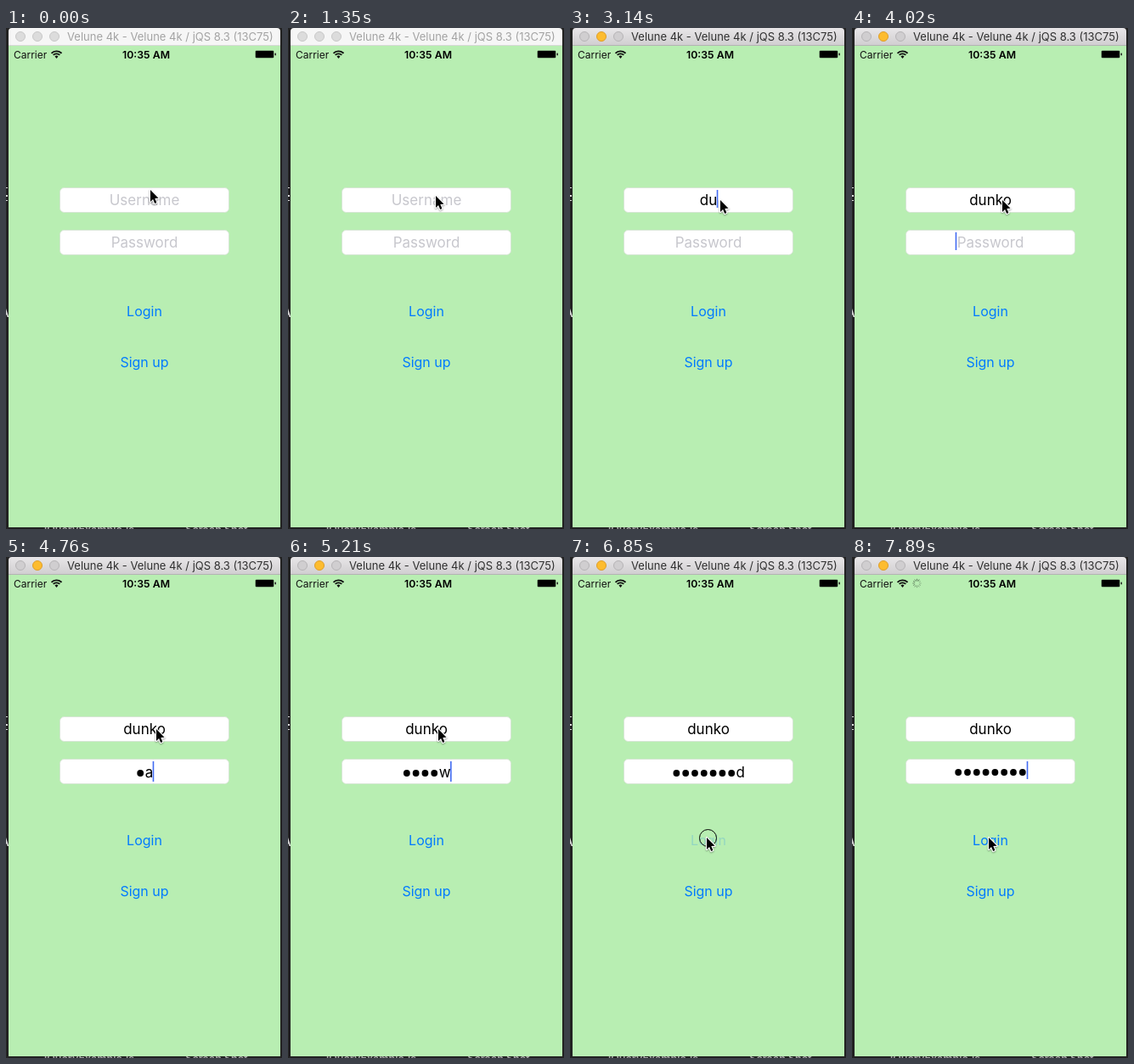
Animation of 325x591 px, one loop 8 s. Source, as an HTML page with a canvas:

```html
<!DOCTYPE html>
<html lang="en">
<head>
<meta charset="utf-8">
<title>Login screen</title>
<style>
  html, body { margin: 0; width: 100%; height: 100%; overflow: hidden; background: #222; }
  canvas { display: block; }
</style>
</head>
<body>
<canvas id="stage" width="325" height="591"></canvas>
<script>
const ctx = document.getElementById('stage').getContext('2d');
const LOOP = 8000, CENTER = 163, DOT = 10.8;
const USER = 'dunko', SECRET = 'password';

// Timelines: [start time, value]; each value holds until the next entry.
const pointer = [[0, [170, 191]], [1350, [174, 198]], [1490, [177, 203]], [6100, [182, 296]],
  [6250, [171, 355]], [6400, [163, 340]], [6550, [161, 331]]];
const pressed = [[0, false], [1790, true], [1940, false], [6850, true], [7000, false]];
const caret = [[0, ''], [1940, 'user'], [2540, ''], [2990, 'user'], [4020, 'pass'],
  [6400, ''], [7000, 'pass'], [7590, ''], [7890, 'pass']];
const userLength = [[0, 0], [2990, 1], [3140, 2], [3290, 4], [3430, 5]];
const passLength = [[0, 0], ...[4610, 4760, 4910, 5060, 5210, 5360, 5510, 5810].map((t, i) => [t, i + 1])];
const loginAlpha = [[0, 1], [6850, 0.2], [7000, 0.45], [7150, 0.85], [7300, 1]];
const MASK_LAST = 7740, SPINNER_START = 7150, ACTIVATE = 1790;

const at = (timeline, t) => timeline.filter(([start]) => start <= t).pop()[1];

function rect(x, y, w, h, color) {
  ctx.fillStyle = color;
  ctx.fillRect(x, y, w, h);
}

function round(x, y, w, h, r, fill, stroke) {
  ctx.beginPath();
  ctx.roundRect(x, y, w, h, r);
  if (fill) { ctx.fillStyle = fill; ctx.fill(); }
  if (stroke) { ctx.strokeStyle = stroke; ctx.lineWidth = 1; ctx.stroke(); }
}

function circle(x, y, r, fill, stroke) {
  round(x - r, y - r, 2 * r, 2 * r, r, fill, stroke);
}

function text(str, x, y, size, color, align = 'center', weight = 400) {
  ctx.font = `${weight} ${size}px Inter, sans-serif`;
  ctx.textAlign = align;
  ctx.fillStyle = color;
  ctx.fillText(str, x, y);
}

function textWidth(str, size) {
  ctx.font = `400 ${size}px Inter, sans-serif`;
  return ctx.measureText(str).width;
}

function desktop() {
  rect(0, 0, 325, 591, '#222');
  text('jQueryExample.js', 98, 596, 12.5, '#aaa', 'center', 600);
  text('Screen Shot', 248, 596, 12.5, '#aaa', 'center', 600);
  text('A', -5.5, 341, 12.5, '#ddd', 'left', 600);
  for (const [y, h] of [[188, 1], [197, 2], [203, 1]]) rect(0, y, 2, h, '#ddd');
}

function titleBar(active) {
  const fill = ctx.createLinearGradient(0, 0, 0, 20);
  fill.addColorStop(0, active ? '#e8e6e8' : '#f6f6f6');
  fill.addColorStop(1, active ? '#d1cfd1' : '#f6f6f6');
  round(3, 0, 320, 30, 4, fill);
  rect(3, 20, 320, 1, active ? '#b4b2b4' : '#d8d8d8');
  const gray = active ? ['#d0ced0', '#b6b4b6'] : ['#dcdcdc', '#c8c8c8'];
  [17, 37, 57].forEach((x, i) =>
    circle(x, 10, 5.5, ...(active && i === 1 ? ['#fdbc2f', '#dd9e2a'] : gray)));
  text('Velune 4k - Velune 4k / jQS 8.3 (13C75)', 72, 15, 13, active ? '#303030' : '#a3a3a3', 'left');
}

function statusBar(t) {
  text('Carrier', 9, 35.5, 12, '#111', 'left');
  text('10:35 AM', 165, 35.5, 12.3, '#000', 'center', 600);

  ctx.strokeStyle = '#111';
  ctx.lineWidth = 1.8;
  for (const r of [8.2, 5.2]) {
    ctx.beginPath();
    ctx.arc(59.5, 35.5, r, -Math.PI * 0.76, -Math.PI * 0.24);
    ctx.stroke();
  }
  ctx.beginPath();
  ctx.moveTo(59.5, 36);
  ctx.arc(59.5, 35.5, 2.8, -Math.PI * 0.76, -Math.PI * 0.24);
  ctx.fillStyle = '#111';
  ctx.fill();

  round(293.5, 26.5, 22, 9, 2, null, 'rgba(0,0,0,.25)');
  rect(294, 27, 21, 8, '#000');
  round(316.5, 29.5, 1.5, 3, 1, '#222');

  if (t >= SPINNER_START) spinner(76.5, 31, Math.floor((t - SPINNER_START) / 148) * 2);
}

function spinner(x, y, head) {
  ctx.lineWidth = 0.9;
  for (let i = 0; i < 12; i++) {
    const angle = (head - i) * Math.PI / 6;
    const dx = Math.cos(angle), dy = Math.sin(angle);
    ctx.strokeStyle = `rgba(50,65,50,${0.8 - i * 0.045})`;
    ctx.beginPath();
    ctx.moveTo(x + dx * 2.7, y + dy * 2.7);
    ctx.lineTo(x + dx * 5.2, y + dy * 5.2);
    ctx.stroke();
  }
}

// Draws a centred field; masked fields show dots and optionally the last letter.
function field(y, placeholder, value, focused, masked, showLast) {
  round(63.5, y - 0.5, 199, 29, 5, '#fff', '#d6e6d4');
  let caretX, caretHeight = 21;
  if (!value) {
    text(placeholder, CENTER, y + 20, 17, '#c7c7cd');
    caretX = CENTER - textWidth(placeholder, 17) / 2 - 2;
  } else if (!masked) {
    text(value, CENTER, y + 20, 17, '#000');
    caretX = CENTER + textWidth(value, 17) / 2 - 0.5;
  } else {
    const dots = value.length - (showLast ? 1 : 0);
    const last = showLast ? value.slice(-1) : '';
    const width = dots * DOT + textWidth(last, 17);
    const left = CENTER - width / 2;
    const dotY = y + (showLast ? 16 : 15);
    for (let i = 0; i < dots; i++) circle(left + DOT * (i + 0.5), dotY, 3.9, '#000');
    text(last, left + dots * DOT, y + 21, 17, '#000', 'left');
    caretX = left + width - 0.5;
    if (showLast) caretHeight = 24;
  }
  if (focused) rect(caretX, y + 2, 1.6, caretHeight, '#426bf2');
}

function arrow(x, y) {
  ctx.save();
  ctx.translate(x, y);
  ctx.beginPath();
  [[0, 0], [0, 14], [3.1, 11], [5.2, 16], [7.4, 15.1], [5.3, 10.1], [9.6, 9.8]]
    .forEach(p => ctx.lineTo(...p));
  ctx.closePath();
  ctx.lineJoin = 'round';
  ctx.shadowColor = 'rgba(0,0,0,.35)';
  ctx.shadowBlur = 2;
  ctx.shadowOffsetY = 1;
  ctx.strokeStyle = '#fff';
  ctx.lineWidth = 2.2;
  ctx.stroke();
  ctx.shadowColor = 'transparent';
  ctx.fillStyle = '#000';
  ctx.fill();
  ctx.restore();
}

function draw(t) {
  desktop();
  titleBar(t >= ACTIVATE);
  rect(3, 21, 320, 568, '#b8eeb2');
  statusBar(t);

  const focus = at(caret, t);
  field(189, 'Username', USER.slice(0, at(userLength, t)), focus === 'user');
  field(239, 'Password', SECRET.slice(0, at(passLength, t)), focus === 'pass', true, t < MASK_LAST);

  ctx.globalAlpha = at(loginAlpha, t);
  text('Login', CENTER, 340, 16, '#007aff');
  ctx.globalAlpha = 1;
  text('Sign up', CENTER, 400, 16, '#007aff');

  const [x, y] = at(pointer, t);
  if (at(pressed, t)) circle(x + 1.5, y + 0.5, 10, null, '#000');
  arrow(x, y);
}

function tick() {
  draw(performance.now() % LOOP);
  requestAnimationFrame(tick);
}
tick();
</script>
</body>
</html>
```
